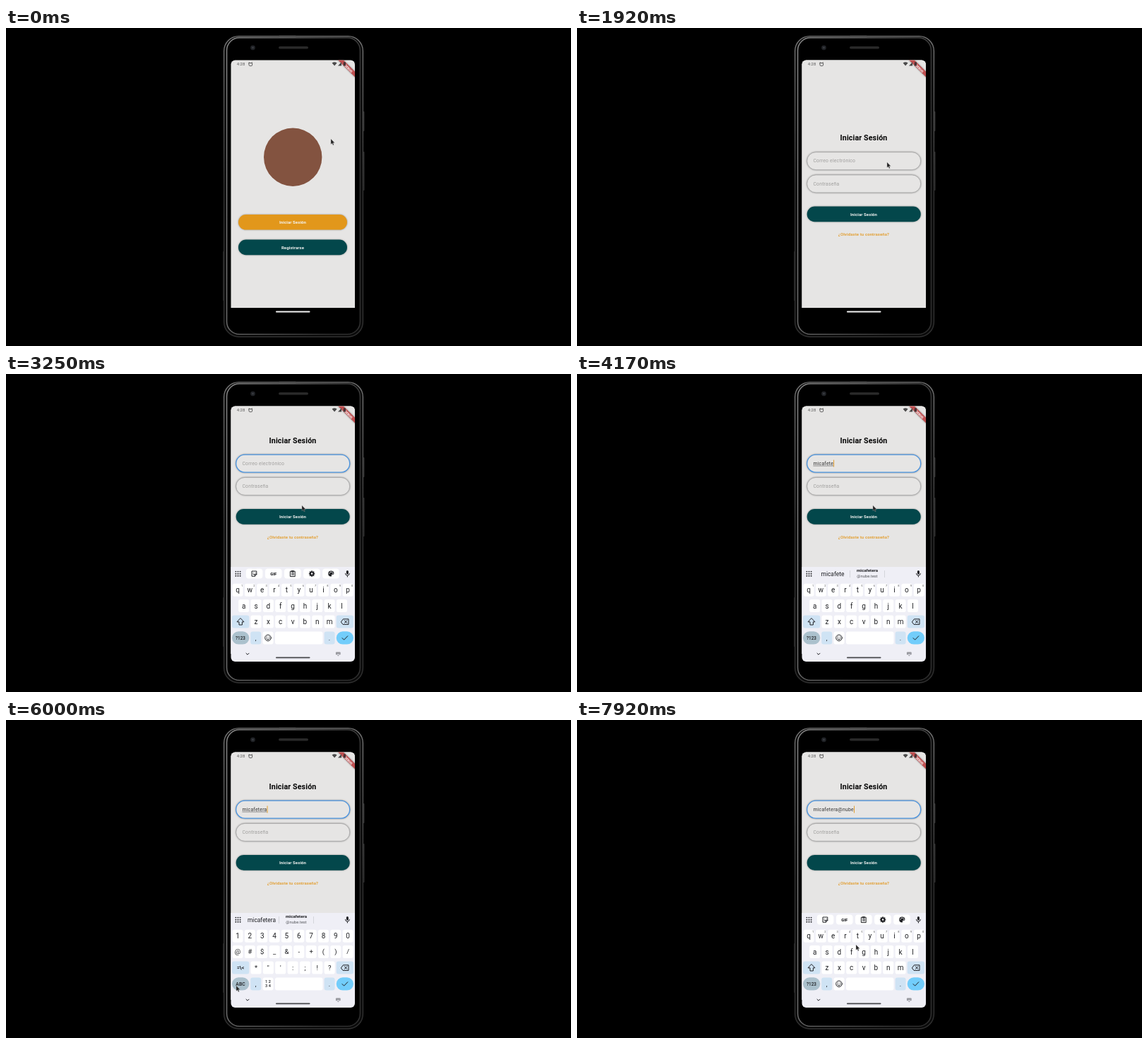
Animation of 800x450 px, one loop 8000 ms. Source, as an HTML page:

```html
<!DOCTYPE html>
<html lang="es">
<head>
<meta charset="utf-8">
<title>Inicio de sesión</title>
<style>
  html, body { margin: 0; width: 100%; height: 100%; overflow: hidden; background: #000; }
  svg { display: block; width: 100vw; height: 100vh; }
  text { font-family: Roboto, sans-serif; white-space: pre; }
  .lift { filter: drop-shadow(0 .9px .9px rgba(0, 0, 0, .38)); }
  .ribbon { filter: drop-shadow(0 0 1.3px rgba(0, 0, 0, .5)); }
  .line { fill: none; stroke: #1f2024; stroke-width: 1; stroke-linecap: round; stroke-linejoin: round; }
</style>
</head>
<body>
<svg id="stage" viewBox="0 0 800 450"></svg>
<script>
const FPS = 12, FRAMES = 96;
const BG = '#e6e5e4', TEAL = '#03474b', ORANGE = '#e2971b', INK = '#1f2024';
const KEY_BLUE = '#cfe3f4';
const USER = 'micafetera', DOMAIN = '@nube.test', EMAIL = USER + DOMAIN;
const KEYBOARD_H = 134;

const rect = (x, y, w, h, r, fill, more = '') =>
  `<rect x="${x}" y="${y}" width="${w}" height="${h}" rx="${r}" fill="${fill}" ${more}/>`;
const label = (s, x, y, size, fill, more = '', anchor = 'middle') =>
  `<text x="${x}" y="${y + size * .355}" font-size="${size}" fill="${fill}" text-anchor="${anchor}" ${more}>${s}</text>`;
const line = (d, more = '') => `<path class="line" d="${d}" ${more}/>`;
const dot = (x, y, r, fill = INK, more = '') => `<circle cx="${x}" cy="${y}" r="${r}" fill="${fill}" ${more}/>`;
const group = (id, body, more = '') => `<g id="${id}" ${more}>${body}</g>`;
const fade = (id, x2, y2, from, to) =>
  `<linearGradient id="${id}" x2="${x2}" y2="${y2}"><stop stop-color="${from}"/><stop offset="1" stop-color="${to}"/></linearGradient>`;
const esc = s => s.replace(/&/g, '&amp;').replace(/</g, '&lt;');

const BOLD = 'font-weight="700" letter-spacing=".1"';
const HINT = 'letter-spacing=".214"';

function button(s, x, y, w, fill) {
  return rect(x, y, w, 21.6, 10.8, fill, 'class="lift"') + label(s, 406, y + 10.8, 6, '#f4f4f2', BOLD);
}

function field(id, y) {
  return rect(325.7, y, 161, 25, 12.5, BG, `id="${id}" class="lift" stroke="#a3a3a2" stroke-width=".8"`);
}

function phone() {
  return fade('rim', 0, .5, '#777', '#303030') + fade('sheen', 1, .35, '#8a8a8a', '#333') +
    rect(505, 118, 2.6, 28, 1, '#2b2b2b') + rect(505, 175, 2.6, 55, 1, '#2b2b2b') +
    rect(307.2, 316, 1.6, 70, .8, '#2b2b2b') +
    rect(308.6, 11.6, 196.8, 425.4, 21, '#0b0b0b', 'stroke="url(#rim)" stroke-width="1.4"') +
    rect(312.6, 13.8, 188.8, 419.6, 18, '#000', 'stroke="url(#sheen)" stroke-width="1.4"') +
    rect(386, 10.8, 25, 1.4, .7, '#666') +
    dot(349.5, 27.8, 3.4, '#202226') + dot(349.5, 27.8, 1.4, '#3a3d42') +
    rect(386, 26, 42, 3.6, 1.8, '#292929') +
    rect(382, 400.6, 48.5, 1.8, .9, '#f2f2f2');
}

function statusBar() {
  return '<path d="M469.8 45H477.2L495 62.8V70.2Z" fill="#c04f50" class="ribbon"/>' +
    `<g transform="translate(485 57.3) rotate(45)">${label('DEBUG', 0, 0, 4.3, '#fff', 'font-weight="900"')}</g>` +
    label('4:28', 332.6, 51.2, 6, '#5a5a5a') +
    line('M344 49.6h4.6v2.6q0 1.4-1.4 1.4h-1.8q-1.4 0-1.4-1.4zM344.4 48.6l.8.8M348.2 48.6l-.8.8', 'style="stroke:#5a5a5a"') +
    '<path d="M461.6 49.6Q465.1 46.8 468.6 49.6L465.1 53.6ZM470 53.4L475 48.2V53.4Z" fill="#4a4a4a"/>' +
    rect(477.8, 48.2, 3.2, 5.4, .7, '#4a3335');
}

function welcome() {
  return rect(318, 45, 177, 351, 0, BG) + dot(406.2, 182.7, 41.2, '#835340') +
    button('Iniciar Sesión', 329, 264, 154, ORANGE) +
    button('Registrarse', 329, 299.6, 154, TEAL);
}

function login() {
  return rect(318, 45, 177, 351, 0, BG) + group('form',
    label('Iniciar Sesión', 406, 155.4, 10.7, '#050505', BOLD) +
    field('mail', 175.7) + field('pass', 207.9) +
    label('Correo electrónico', 334.4, 188, 6.85, '#a09f9e', HINT + ' id="hint"', 'start') +
    label('Contraseña', 334.4, 220.2, 6.85, '#a09f9e', HINT, 'start') +
    label('', 334.4, 188, 6.85, '#333', 'letter-spacing=".25" id="typed"', 'start') +
    rect(334.4, 191.3, 0, .5, 0, '#444', 'id="underline"') +
    rect(334.4, 183, .9, 10, 0, ORANGE, 'id="caret"') +
    button('Iniciar Sesión', 325.7, 252.6, 161, TEAL) +
    label('¿Olvidaste tu contraseña?', 406, 292.2, 6, '#e2a23a', BOLD));
}

// Keyboard
const colX = i => 328 + i * 17.35;
const key = (s, x, y, size = 10) => rect(x - 7.5, y - 9, 15, 18, 2.8, '#fff') + label(esc(s), x, y, size, INK);
const row = (chars, first, y, size) => [...chars].map((c, i) => key(c, colX(first + i), y, size)).join('');

function letters() {
  const digits = [...'1234567890'].map((d, i) => label(d, colX(i) + 6, 299.2, 4, '#55565c')).join('');
  return row('qwertyuiop', 0, 305.8) + digits + row('asdfghjkl', .5, 328) + row('zxcvbnm', 1.5, 350.6) +
    line('M332.2 345.8l4.8 5h-2.6v4.2h-4.4v-4.2h-2.6z') +
    label('?123', 332, 373.4, 6.4, INK, 'font-weight="500"') +
    dot(371, 373.4, 4.3, 'none', 'class="line"') + dot(369.4, 372.2, .7) + dot(372.6, 372.2, .7) +
    line('M368.7 374.6q2.3 2.6 4.6 0');
}

function symbols() {
  return row('1234567890', 0, 305.8, 10) + row('@#$_&-+()/', 0, 328, 9.5) + row('*"\':;!?', 1.5, 350.6, 9.5) +
    label('=\\&lt;', 332, 350.6, 6.8, INK, 'font-weight="700"') +
    label('ABC', 332, 373.4, 6.8, INK, 'font-weight="500"') +
    label('1 2', 371, 370.4, 5.6, INK, 'font-weight="500"') + label('3 4', 371, 376.4, 5.6, INK, 'font-weight="500"');
}

function tools() {
  const pills = [0, 1, 2, 3, 4].map(i => rect(339.8 + i * 27.1, 275.6, 23.6, 14, 4, '#fff')).join('');
  const teeth = [0, 1, 2, 3, 4, 5, 6, 7].map(i =>
    `<rect x="-.9" y="-4.2" width="1.8" height="2" fill="${INK}" transform="translate(433.1 282.6) rotate(${i * 45})"/>`).join('');
  return pills +
    line('M348.4 279h6.4v4.6l-2.4 2.6h-4zM354.8 283.4h-2.4v2.6M350 281.6h.1M353 281.6h.1M349.8 283.4q1 .8 2 .3') +
    label('GIF', 378.7, 282.7, 5.8, INK, 'font-weight="900"') +
    line('M402.8 279.2h6.4v7.4h-6.4zM404.6 278.6h2.8v1.4h-2.8zM404.4 282h3.2M404.4 284h3.2') +
    teeth + dot(433.1, 282.6, 2.2, 'none', `stroke="${INK}" stroke-width="1.9"`) +
    `<path d="M460.2 278.6a4 4 0 1 0 0 8q1.4-.2.8-1.6t1-1.2h1.2q1.2-.2 1.2-1.6a4.1 3.8 0 0 0-4.2-3.6z" fill="${INK}"/>` +
    dot(458, 282, .7, '#fff') + dot(459.4, 280.3, .7, '#fff') + dot(461.4, 280.3, .7, '#fff') + dot(462.8, 282, .7, '#fff');
}

function suggestions() {
  return label('', 362, 283, 8.4, INK, 'id="guess"') +
    rect(386.4, 278, .6, 10, 0, '#c2c3ca') + rect(435, 278, .6, 10, 0, '#c2c3ca') +
    label(USER, 411, 277.6, 6.2, INK, 'font-weight="700"') +
    label(DOMAIN, 411, 285.6, 5.8, '#55565c');
}

function keyboard() {
  const grid = [0, 1, 2].map(r => [0, 1, 2].map(c => dot(325.4 + c * 3.1, 279.6 + r * 3.1, .95)).join('')).join('');
  return rect(318, 273, 177, KEYBOARD_H + 1, 0, '#efeff6') + grid +
    rect(481.9, 278, 3, 5.4, 1.5, INK) + line('M480.4 282.4q.3 2.8 3 2.8t3-2.8M483.4 285.4v1.6') +
    rect(320, 341.6, 24.3, 18, 3, KEY_BLUE) + rect(467.7, 341.6, 24.3, 18, 3, KEY_BLUE) +
    line('M474.6 350.6l2.8-3.8h7.6v7.6h-7.6zM479.4 348.8l3.4 3.6M482.8 348.8l-3.4 3.6') +
    rect(320, 364.2, 24.3, 18.4, 9.2, '#abc1cd') + rect(346.2, 364.4, 15, 18, 3, KEY_BLUE) +
    rect(363.5, 364.4, 15, 18, 3, '#fff') + rect(381, 364.4, 67.5, 18, 3, '#fff') +
    rect(450.6, 364.4, 15, 18, 3, KEY_BLUE) + rect(467.7, 364.2, 24.3, 18.4, 9.2, '#72cdfb') +
    label(',', 353.7, 373.4, 9, INK) + label('.', 458, 373.4, 9, INK) +
    line('M476 373.6l2.6 2.6 5.2-5.4') +
    group('letters', letters()) + group('symbols', symbols()) +
    group('tools', tools()) + group('suggest', suggestions()) +
    line('M340 395.2l2 2 2-2') +
    rect(382, 400.6, 48.5, 1.7, .8, '#47484c') +
    rect(467, 393.6, 6.6, 3.6, .6, '#8b8c92') +
    line('M468 395h.1M470.2 395h.1M472.4 395h.1M468.8 396.3h3', 'style="stroke:#efeff6;stroke-width:.6"') +
    '<path d="M469 398h2.6l-1.3 1.2z" fill="#8b8c92"/>';
}

document.getElementById('stage').innerHTML =
  '<clipPath id="screen"><rect x="318.5" y="45.5" width="175.5" height="361.5" rx="6"/></clipPath>' +
  phone() +
  `<g clip-path="url(#screen)">${welcome()}${group('login', login())}${statusBar()}${group('keys', keyboard())}</g>` +
  group('pointer', '<path d="M0 0V7.6L1.8 6L3 8.8L4.2 8.3L3 5.6H5.3Z" fill="#242424" stroke="#b8b8b8" stroke-width=".35"/>');

const ui = {};
document.querySelectorAll('[id]').forEach(e => ui[e.id] = e);

// All times below are in twelfths of a second.
const PATH = [[7, 460, 157], [10, 468, 190], [14, 445, 261], [17, 440, 267], [18, 440, 267], [23, 439, 190],
  [27, 438, 190], [29, 419, 186], [61, 419, 186], [65, 365, 300], [68, 316, 366], [70, 326, 376], [72, 326, 376],
  [76, 325, 326], [78, 326, 327], [81, 330, 374], [83, 330, 374], [88, 395, 318]];
const STROKES = [41, 42, 43, 44, 45, 46, 47, 49, 52, 55, 77, 91, 92, 93, 95];
const FOCUS = 31, SYMBOLS_ON = 69, SYMBOLS_OFF = 83, AT_SIGN = 77;

const clamp = v => Math.min(1, Math.max(0, v));
const easeOut = v => 1 - (1 - clamp(v)) ** 3;
const show = (e, on) => e.setAttribute('display', on ? 'inline' : 'none');

function pointerAt(n) {
  const i = PATH.findIndex(p => p[0] > n);
  if (i === 0) return PATH[0].slice(1);
  if (i < 0) return PATH[PATH.length - 1].slice(1);
  const [a, ax, ay] = PATH[i - 1], [b, bx, by] = PATH[i], k = (n - a) / (b - a);
  return [ax + (bx - ax) * k, ay + (by - ay) * k];
}

function render(n) {
  const [px, py] = pointerAt(n);
  ui.pointer.setAttribute('transform', `translate(${px} ${py})`);

  const enter = easeOut((n - 17.5) / 4), zoom = .85 + .15 * enter;
  show(ui.login, n >= 18);
  ui.login.setAttribute('opacity', enter);
  ui.login.setAttribute('transform', `translate(406 221) scale(${zoom}) translate(-406 -221)`);

  const rise = at => easeOut((at - 31.7) / 4.8);
  ui.keys.setAttribute('transform', `translate(0 ${KEYBOARD_H * (1 - rise(n))})`);
  show(ui.keys, n > 31.7);
  const inset = Math.max(0, KEYBOARD_H * rise(n - .25) - 11);
  ui.form.setAttribute('transform', `translate(0 ${-inset / 2})`);

  const focused = n >= FOCUS;
  ui.mail.setAttribute('stroke', focused ? '#4a94e0' : '#a3a3a2');
  ui.mail.setAttribute('stroke-width', focused ? 1.3 : .8);

  const count = STROKES.filter(s => s <= n).length;
  const typed = EMAIL.slice(0, count);
  ui.typed.textContent = typed;
  show(ui.hint, !count);
  const width = count ? ui.typed.getComputedTextLength() : 0;
  ui.underline.setAttribute('width', n < AT_SIGN ? width : 0);
  ui.caret.setAttribute('x', 334.4 + width);
  const last = count ? STROKES[count - 1] : FOCUS;
  show(ui.caret, focused && Math.floor((n - last) / 6) % 2 === 0);

  const sym = n >= SYMBOLS_ON && n < SYMBOLS_OFF;
  show(ui.symbols, sym);
  show(ui.letters, !sym);
  const suggesting = count > 0 && n < AT_SIGN;
  show(ui.suggest, suggesting);
  show(ui.tools, !suggesting);
  ui.guess.textContent = typed;
}

const start = performance.now();
function tick() {
  const t = (performance.now() - start) % 8000;
  render(Math.floor((t + 4) * FPS / 1000) % FRAMES);
  requestAnimationFrame(tick);
}
tick();
</script>
</body>
</html>
```
